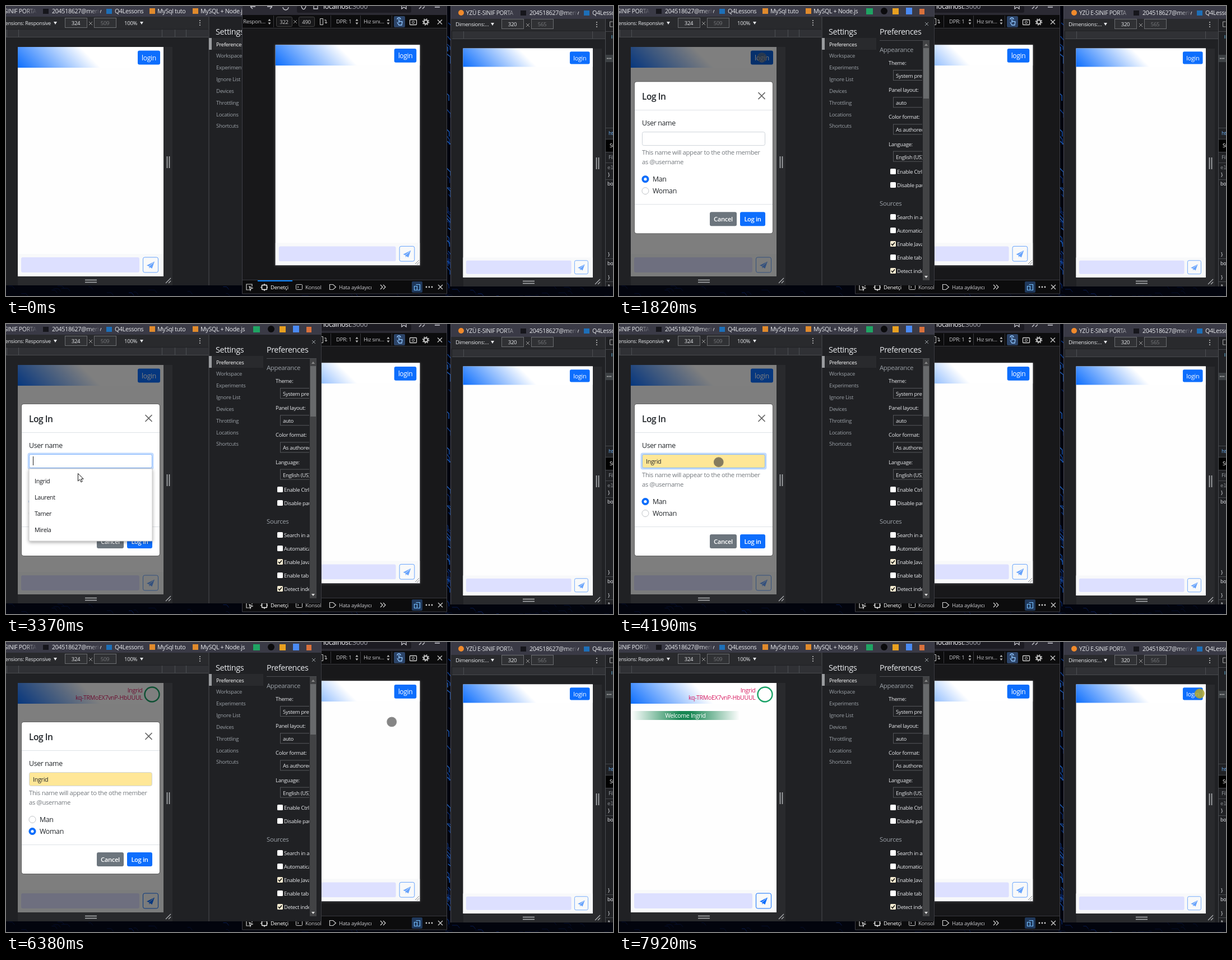
An HTML page for the animation above (8 s loop, 1083 by 517 pixels).

```html
<!DOCTYPE html>
<html lang="en">
<head>
<meta charset="utf-8">
<title>Chat login in three windows</title>
<style>
html, body { margin: 0; width: 100%; height: 100%; overflow: hidden; background: #02040d; }
svg { display: block; width: 1083px; height: 517px; }
text { font-family: "Open Sans", "Noto Sans", sans-serif; letter-spacing: -.03em; white-space: pre; }
.mono { font-family: "Noto Sans Mono", monospace; }
</style>
</head>
<body>
<svg id="stage" viewBox="0 0 1083 517"></svg>
<script>
const BLUE = '#0d6efd', BAR = '#3a3a46', PANE = '#202124', TOOL = '#292a2d', DIM = '#9aa0a6', LIGHT = '#e8eaed';
const USER = 'Ingrid', EASY = [USER, 'Laurent', 'Tamer', 'Mirela'];

const text = (x, y, s, size = 9.4, fill = LIGHT, more = '') =>
  `<text x="${x}" y="${y}" font-size="${size}" fill="${fill}" ${more}>${s}</text>`;
const rect = (x, y, w, h, fill = 'none', r = 0, more = '') =>
  `<rect x="${x}" y="${y}" width="${w}" height="${h}" rx="${r}" fill="${fill}" ${more}/>`;
const line = (d, stroke = '#ccc', w = 1, more = '') =>
  `<path d="${d}" fill="none" stroke="${stroke}" stroke-width="${w}" ${more}/>`;
const shape = (d, fill) => `<path d="${d}" fill="${fill}"/>`;
const dot = (x, y, r, fill = 'none', more = '') => `<circle cx="${x}" cy="${y}" r="${r}" fill="${fill}" ${more}/>`;
const group = (id, s, more = '') => `<g id="${id}" ${more}>${s}</g>`;
const box = (x, y, w, h, s, fill) =>
  rect(x + .5, y + .5, w, h, '#303134', 0, 'stroke="#6b6d70"') +
  text(x + w / 2, y + h / 2 + 4, s, 9.6, fill, 'text-anchor="middle"');
const mid = 'text-anchor="middle"', end = 'text-anchor="end"', bold = ' font-weight="600"';

let seed = 7;
const rnd = () => (seed = seed * 16807 % 2147483647) / 2147483647;

function wallpaper() {
  let s = rect(0, 0, 1083, 517, '#02040d');
  for (let i = 0; i < 34; i++) {
    const y = 30 + rnd() * 460, x = 780 + rnd() * 10;
    s += line(`M${x} ${y}l8 ${6 + rnd() * 5}v${5 + rnd() * 8}`, ['#0f3d8c', '#08245f', '#1c58b0'][i % 3], 1.5);
  }
  for (let i = 0; i < 50; i++)
    s += line(`M${rnd() * 1083} ${499 + rnd() * 18}h${3 + rnd() * 9}l4 5`, i % 4 ? '#050d2a' : '#081a4c', 1);
  return s;
}

const loginButton = id => group(id, rect(214, 6.5, 40, 25, BLUE, 3) + text(234, 24, 'login', 12.2, '#fff', mid));

// One chat page in a 260 wide local space
function page(x, y, scale, h, name, more = '') {
  return `<g transform="translate(${x} ${y}) scale(${scale})">` +
    rect(0, 0, 260, h, '#fefefe') + rect(0, 0, 260, 37, 'url(#sky)') + loginButton(name + 'Login') +
    rect(0, h - 40, 260, 40, '#f8f9fa') + rect(6, h - 34, 211, 27, '#dde0ff', 3) +
    group(name + 'Send', `<g transform="translate(237 ${h - 20.5})">` +
      rect(-13.5, -13.5, 27, 27, 'none', 3, `stroke="${BLUE}"`) +
      shape('M-7 1L7-6L2.5 6.5L-1.5 4L-2 7L-3 2.5Z', BLUE) + line('M-3 2.5L5-4', '#f8f9fa', .8) + '</g>', 'opacity=".62"') +
    more + '</g>';
}

// Drag handles around an emulated device
function handles(x, y, r, b) {
  const my = Math.round((y + b) / 2), mx = Math.round((x + r) / 2);
  return rect(r, y, 16, b - y + 16, TOOL) + rect(x, b, r - x, 16, TOOL) +
    line(`M${r + 6.5} ${my - 10}v21m4 0v-21M${mx - 10} ${b + 6.5}h21m0 4h-21`, '#b0b2b5', 1.6) +
    line(`M${r + 4} ${b + 12}l9-9m0 5l-4 4`, '#b0b2b5', 1.2);
}

function settings() {
  let s = rect(362, 19, 201, 479, PANE) + line('M362 19V498', '#4a4c50') + line('M563 0V498', '#55565c') +
    text(374, 51, 'Settings', 14.5) + rect(362, 57, 97, 21, TOOL) + rect(362, 57, 5, 21, '#9a9c9f');
  ['Preferences', 'Workspace', 'Experiments', 'Ignore List', 'Devices', 'Throttling', 'Locations', 'Shortcuts']
    .forEach((w, i) => s += text(375, 71.5 + i * 20.85, w, 9.5, i ? DIM : '#fff'));
  s += text(465, 51, 'Preferences', 14.3) + line('M546 29l6 6m0-6l-6 6', DIM) + line('M465 61.5H554', '#4a4c50');
  let p = text(465, 82, 'Appearance', 11.4, DIM) + text(465, 356, 'Sources', 11.4, DIM);
  [['Theme:', 'System preference'], ['Panel layout:', 'auto'], ['Color format:', 'As authored'], ['Language:', 'English (US)']]
    .forEach(([a, b], i) => {
      const y = 105 + i * 48.2;
      p += text(481, y, a, 9.5) + rect(489.5, y + 9.5, 70, 18, PANE, 0, 'stroke="#55575b"') + text(494, y + 23, b, 9.5);
    });
  [[295, 'Enable Ctrl + 1-9'], [319, 'Disable paused'], [376, 'Search in all'], [400, 'Automatically'],
   [424, 'Enable JavaScript', 1], [448, 'Enable tab moves', 0], [472, 'Detect indent', 1]].forEach(([y, w, on]) => {
    p += rect(484, y - 5, 10, 10, on ? '#f6ecd2' : '#fff', 1.5) + text(496, y + 4, w, 9.5) +
      (on ? line(`M486 ${y}l2 2.5l4-5`, '#111', 1.6) : '');
  });
  return s + `<g clip-path="url(#prefs)">${p}</g>` + rect(542, 62, 12, 427, '#424345') + rect(543, 75, 10, 90, '#686a6c') +
    shape('M545 71l3-4l3 4z', '#8a8a8a') + shape('M545 481l3 4l3-4z', '#ddd');
}

const fade = (x, y = 0) => rect(x - 20, y, 20, 19, 'url(#fade)');
const mail = '204518627@meriv', school = 'YZÜ E-SINIF PORTA', lessons = 'Q4Lessons';
const ruler = (y, w, x0, marks) => rect(x0, y, w, 14, '#303135') + line(`M${x0} ${y + 13.5}h${w}`, '#47494d') +
  line(marks.map(m => `M${m} ${y}v13`).join(''), '#4c4e52');
const dots = (x, y) => [-4, 0, 4].map(d => dot(x, y + d, 1.1, '#bbb')).join('');
const times = (x, y) => line(`M${x - 3} ${y - 3}l6 6m0-6l-6 6`, '#999');

function leftWindow() {
  const tab = (x, s) => text(x, 13, s, 10.7);
  return rect(0, 0, 563, 498, PANE) + rect(0, 0, 563, 19, BAR) +
    text(54, 13, school, 10.5, LIGHT, end) + fade(55) +
    rect(66, 5, 10, 9, '#16161c') + tab(82, mail) + fade(168) + rect(179, 5, 10, 9, '#1d6fb8') + tab(194, lessons) +
    rect(256, 4, 10, 10, '#e08a2c') + tab(270, 'MySql tuto') + rect(333, 4, 10, 10, '#e08a2c') + tab(347, 'MySQL + Node.js') +
    rect(441, 4, 12, 11, '#1fa463') + dot(473, 9, 6, '#0b0b0d') + rect(488, 4, 11, 11, '#e8a020') +
    rect(512, 3, 11, 12, '#4a8af4') + rect(536, 5, 9, 10, '#d9713c') +
    rect(0, 19, 362, 22, TOOL) + text(80, 33.5, 'Dimensions: Responsive', 9.2, LIGHT, end) + shape('M85 28h6l-3 5z', LIGHT) +
    box(105, 21, 39, 17, '324', LIGHT) + times(151, 31) + box(157, 21, 39, 17, '509', '#77797c') +
    text(211, 33.5, '100%', 9.6) + shape('M239 28h6l-3 5z', LIGHT) + dots(346, 30) +
    ruler(42, 361, 0, [1.5, 22.5, 278.5, 301.5, 321.5]) + handles(21, 73, 281, 482) +
    page(21, 73, 1, 409, 'left', member() + rect(0, 0, 260, 409, '#000', 0, 'id="shade"')) +
    modal() + settings();
}

const member = () => group('member',
    text(222.5, 17, USER, 10.6, '#d81b60', end) + text(222.5, 30, 'kq-TRMoEX7vnP-HbUUUL', 10.6, '#d81b60', end) +
    dot(239.5, 20.5, 13, '#fff', 'stroke="#1aa267" stroke-width="2.4"')) +
  group('welcome', rect(1, 50, 193, 16, 'url(#green)') + text(97.5, 62, 'Welcome ' + USER, 10.6, '#fff', mid));

function modal() {
  const ink = '#212529';
  const radio = (y, id) => dot(47, y, 6, '#fff', 'stroke="#bfc3c7"') +
    group(id, dot(47, y, 6.5, BLUE) + dot(47, y, 2.6, '#fff'));
  let list = rect(41, 258, 220, 129, '#fff', 1, 'stroke="#b8b8b8" stroke-width=".8" filter="url(#soft)"') +
    rect(41, 265, 220, 29, '#ececec', 0, 'id="hover"');
  EASY.forEach((n, i) => list += text(51, 283.5 + i * 29, n, 10.8, '#16181c'));
  return group('modal', rect(28, 143, 246, 270, '#fff', 4, 'stroke="#0004" stroke-width="2" paint-order="stroke"') +
    text(41, 174.5, 'Log In', 15.6, ink, bold) + line('M248.5 162l12 12m0-12l-12 12', '#666', 1.7) +
    line('M28 193.5H274M28 361.5H274', '#dee2e6') + text(41, 221, 'User name', 12.4, ink) +
    rect(38.5, 229.5, 225, 30, '#c2dbfe', 4, 'id="ring"') +
    rect(41.5, 232.5, 219, 24, '#fff', 3, 'id="field"') + text(48, 249, USER, 10.8, ink, 'id="typed"') +
    line('M48.5 236V252', '#222', 1, 'id="caret"') +
    text(41, 273, 'This name will appear to the othe member', 11.3, '#74797e') + text(41, 290, 'as @username', 11.3, '#74797e') +
    dot(47, 337.5, 9.3, '#b6d4fe', 'id="halo"') + radio(316.5, 'man') + radio(337.5, 'woman') +
    text(60, 321, 'Man', 12.4, ink) + text(60, 342, 'Woman', 12.4, ink) +
    rect(162, 375, 48, 25, '#6c757d', 3) + text(186, 392, 'Cancel', 11.2, '#fff', mid + bold) +
    rect(216, 375, 45, 25, BLUE, 3) + text(238.5, 392, 'Log in', 11.2, '#fff', mid + bold) + group('list', list));
}

function middleWindow() {
  const spin = x => shape(`M${x - 2.5} 26.5l2.5-3.5l2.5 3.5zM${x - 2.5} 29.5l2.5 3.5l2.5-3.5z`, '#bbb');
  const cross = (x, y) => line(`M${x - 4} ${y - 4}l8 8m0-8l-8 8`, '#ccc', 1.3);
  const size = (x, s) => rect(x + .5, 19.5, 28, 17, '#18181a', 2, 'stroke="#444"') + text(x + 14, 32, s, 9.5, '#ccc', mid);
  return rect(421, 0, 366, 513, '#18181a') + rect(421, 0, 366, 16, '#2b2a33') + rect(519, 0, 204, 12, '#1c1b22', 3) +
    line('M436 1h9m-9 0l4 4m26-4h9m0 0l-4 4M494 2a5 5 0 0 0 10 0M527 0q1 5 4 6q3-1 4-6M549 0v5h7v-5M706 0v5l4-3l4 3v-5M737 5l4-4m2 4l4-4M765 2h9', '#c8c8cf', 1.3) +
    text(566, 4.5, 'localhost<tspan fill="#9a9aa4">:3000</tspan>', 12.5, '#fbfbfe') +
    rect(421, 16, 366, 23, '#0c0c0d') + line('M421 39.5H787', '#38383d') +
    text(423, 31, 'Respon…', 9.8, '#c4c4c8') + spin(470) + line('M477.5 17V38M579.5 17V38M632.5 17V38M688.5 17V38', '#38383d') +
    size(482, '322') + times(516, 28) + size(522, '490') +
    line('M560.5 22.5h5v11h-5zM568 25h3v6m-2-2l2 2l2-2', '#ccc') +
    text(589, 31, 'DPR: 1', 9.6, '#c4c4c8') + spin(626) + text(638, 31, 'Hız sını…', 9.6, '#c4c4c8') + spin(682) +
    rect(692, 18, 20, 20, '#2c4468', 2) + line('M701 30v-7m-3 6l3 5h5l1-6l-6-1M698 24a3 3 0 0 1 6 0', '#8fc6ff', 1.3) +
    rect(720.5, 24.5, 12, 9, 'none', 1, 'stroke="#ccc" stroke-width="1.3"') + dot(726.5, 29, 2, 'none', 'stroke="#ccc"') +
    dot(749, 28.5, 3.5, 'none', 'stroke="#ccc" stroke-width="2.2"') + dot(749, 28.5, 5.5, 'none', 'stroke="#ccc" stroke-width="1.6" stroke-dasharray="2 2.3"') +
    cross(774, 28.5) + rect(480, 69, 259, 394, '#4a4a50', 0, 'filter="url(#glow)"') + page(480.8, 69.5, .99, 396.5, 'mid') +
    line('M730 460l7-7m0 4l-4 4', '#888') +
    rect(421, 489, 366, 24, '#0c0c0d') + line('M421 488.5H787', '#38383d') + rect(449, 489, 62, 2, '#0a84ff') +
    line('M436 506h-7v-10h10v4M434 500l6 3l-3 1l-1 3z', '#ccc', 1.2) + rect(456.5, 497.5, 9, 8, 'none', 1, 'stroke="#fff" stroke-width="1.4"') +
    line('M461 495v2m0 9v2M454 501.5h2m9 0h2', '#fff', 1.2) + text(472, 505, 'Denetçi', 9.6, '#fff') +
    rect(517.5, 496.5, 11, 9, 'none', 1, 'stroke="#ccc"') + line('M520 499l2 2l-2 2', '#ccc') + text(534, 505, 'Konsol', 9.6, '#c8c8cc') +
    line('M577.5 496.5h6l5 4.5l-5 4.5h-6z', '#ccc', 1.2) + text(594, 505, 'Hata ayıklayıcı', 9.5, '#c8c8cc') +
    line('M668 497l4 4l-4 4m5-8l4 4l-4 4', '#ccc', 1.3) + rect(724, 491, 19, 20, '#20395c', 2) +
    line('M731.5 496.5h7v10h-4M728.5 499.5h5v7h-5z', '#75bfff', 1.2) +
    [750, 755, 760].map(x => dot(x, 501, 1.4, '#ccc')).join('') + cross(775, 501) +
    line('M421.5 0V513H786.5V0', '#3e3e46');
}

function rightWindow() {
  const code = (y, s, fill = '#dfe1e5') => text(1073, y, s, 9, fill, 'class="mono"');
  return rect(793, 0, 290, 500, PANE) + rect(793, 0, 290, 23, BAR) + dot(812, 12, 5, '#f08a2c') +
    text(821, 16, school, 10.2) + fade(912, 4) + rect(918, 8, 10, 9, '#16161c') + text(934, 16, mail, 10.7) + fade(1020, 4) +
    rect(1031, 8, 10, 9, '#1d6fb8') + text(1046, 16, lessons, 10.7) +
    rect(793, 23, 290, 21, TOOL) + text(802, 36, 'Dimensions:…', 9.6) + shape('M865 30h6l-3 5z', LIGHT) +
    box(884, 23, 39, 17, '320', LIGHT) + times(931, 34) + box(937, 23, 39, 17, '565', '#77797c') + dots(1054, 33) +
    ruler(45, 273, 796, [816.5, 1046.5]) + handles(816, 76, 1047, 484) + page(815.5, 75.5, .89, 459, 'right') +
    rect(1069, 23, 14, 477, PANE) + line('M1069.5 23V500', '#4a4c50') + line('M1082.5 28h-5v9h5', '#aaa') +
    line([45, 217, 237, 260, 279, 309, 450, 491].map(y => `M1070 ${y + .5}H1083`).join(''), '#47494d') +
    rect(1070, 87, 13, 13, '#3c4043') + [1073, 1076, 1079].map(x => dot(x, 93.5, 1, '#ccc')).join('') +
    line('M1081 52v6', '#5db0d7') + text(1075, 230, 'html', 9.4, '#6cb2f5') + rect(1070, 238, 13, 22, '#000') + text(1077, 252, 'Styles', 9.4, '#fff') +
    text(1075, 273, 'Filter', 9.4, DIM) + code(291, 'el', '#85888c') + code(304, '}') + code(320, 'bo') + code(446, '}') +
    code(462, 'bo') + code(487, '}') + code(503, '*') + line('M793.5 0V500', '#4a4a55');
}

const gradient = (id, stops, more) => `<linearGradient id="${id}" ${more}>` +
  stops.map(([o, c, a]) => `<stop offset="${o}" stop-color="${c}" stop-opacity="${a}"/>`).join('') + '</linearGradient>';

const stage = document.getElementById('stage');
stage.innerHTML = '<defs>' +
  gradient('sky', [[0, BLUE, 1], [1, '#fff', 1]], 'gradientUnits="userSpaceOnUse" x1="55.8" y1="92.7" x2="130" y2="18.5"') +
  gradient('green', [[0, '#198754', 0], [.45, '#198754', 1], [.55, '#198754', 1], [1, '#198754', 0]], '') +
  gradient('fade', [[0, BAR, 0], [1, BAR, 1]], '') +
  '<filter id="soft"><feDropShadow dx="0" dy="2" stdDeviation="3" flood-opacity=".35"/></filter>' +
  '<filter id="glow"><feDropShadow dx="0" dy="0" stdDeviation="2" flood-color="#9b9b9b" flood-opacity=".3"/></filter>' +
  '<clipPath id="prefs"><path d="M464 62H541V489H464Z"/></clipPath>' +
  '<clipPath id="behind"><path d="M563 0H800V517H400V498H563Z"/></clipPath></defs>' +
  wallpaper() + leftWindow() + group('middle', middleWindow()) + rightWindow() +
  group('cursor', dot(0, 0, 8.3, '#3c3c3c', 'id="touch" stroke="#444" stroke-width="1.2"') +
    `<path id="arrow" d="M.5 .5V14L3.7 11L5.9 15.8L8.2 14.8L6 10.2H10.2Z" fill="#fff" stroke="#111"/>`);

const el = id => document.getElementById(id);
const show = (id, on) => el(id).style.display = on ? '' : 'none';
const set = (id, name, value) => el(id).setAttribute(name, value);
const ramp = (t, a, b) => Math.min(1, Math.max(0, (t - a) / (b - a)));
const during = (t, a, b) => t >= a && t < b;

// time, x, y
const path = [[70, 1056, 380], [820, 257, 84], [940, 255, 92], [2240, 255, 92], [2300, 262, 112], [2380, 188, 195],
  [2840, 136, 242], [3170, 136, 242], [3370, 128, 266], [3570, 120, 270], [3770, 117, 272], [4040, 117, 272],
  [4190, 178, 246], [4580, 86, 338], [4720, 86, 338], [5130, 218, 386], [5820, 218, 386], [6580, 855, 56],
  [6840, 880, 86], [7450, 959, 151], [7920, 1036, 92], [8000, 1036, 92]];
const devices = [[21, 73, 281, 482], [480, 69, 739, 462], [816, 76, 1047, 484]];

function drawCursor(t) {
  const i = Math.max(1, path.findIndex(p => p[0] > t));
  const [t0, x0, y0] = path[i - 1], [t1, x1, y1] = path[i], k = ramp(t, t0, t1);
  const x = x0 + (x1 - x0) * k, y = y0 + (y1 - y0) * k;
  const inside = devices.some(([l, top, r, b]) => x > l && x < r && y > top && y < b);
  const touch = inside && !during(t, 3170, 4040), pressed = during(t, 1140, 1700) || during(t, 5130, 5820);
  show('cursor', t >= 70);
  set('cursor', 'transform', `translate(${x} ${y})`);
  show('touch', touch);
  show('arrow', !touch);
  const lit = t >= 7890;
  set('touch', 'fill', lit ? '#b8ac2c' : '#3c3c3c');
  set('touch', 'stroke', lit ? '#a89f30' : '#444');
  set('touch', 'opacity', lit ? .85 : pressed ? .75 : .62);
}

function draw(t) {
  if (t >= 1140) set('middle', 'clip-path', 'url(#behind)');
  else el('middle').removeAttribute('clip-path');

  const open = t < 4000;
  set('shade', 'opacity', .5 * (open ? ramp(t, 1464, 1614) : 1 - ramp(t, 6740, 6900)));
  const slide = open ? (1 - ramp(t, 1640, 1940)) ** 2 : ramp(t, 6620, 6820) ** 2;
  set('modal', 'opacity', open ? ramp(t, 1640, 1790) : 1 - ramp(t, 6620, 6770));
  set('modal', 'transform', `translate(0 ${-50 * slide})`);
  el('leftLogin').firstChild.setAttribute('fill', during(t, 1230, 2240) ? '#0b5ed7' : BLUE);

  const focus = during(t, 2980, 4720), filled = t >= 3470;
  show('ring', focus);
  set('field', 'stroke', focus ? '#86b7fe' : '#ced4da');
  set('field', 'fill', filled ? '#ffe797' : '#fff');
  show('typed', filled);
  show('caret', focus && !filled);
  show('list', during(t, 3100, 3950));
  show('hover', filled);
  show('man', t < 4780);
  show('woman', t >= 4780);
  show('halo', during(t, 4780, 5820));

  const joined = t >= 5890;
  show('leftLogin', !joined);
  show('member', joined);
  set('leftSend', 'opacity', joined ? 1 : .62);
  show('welcome', t >= 6650);
  drawCursor(t);
}

const start = performance.now();
function tick(now) {
  draw(Math.max(0, now - start) % 8000);
  requestAnimationFrame(tick);
}
draw(0);
requestAnimationFrame(tick);
</script>
</body>
</html>
```
